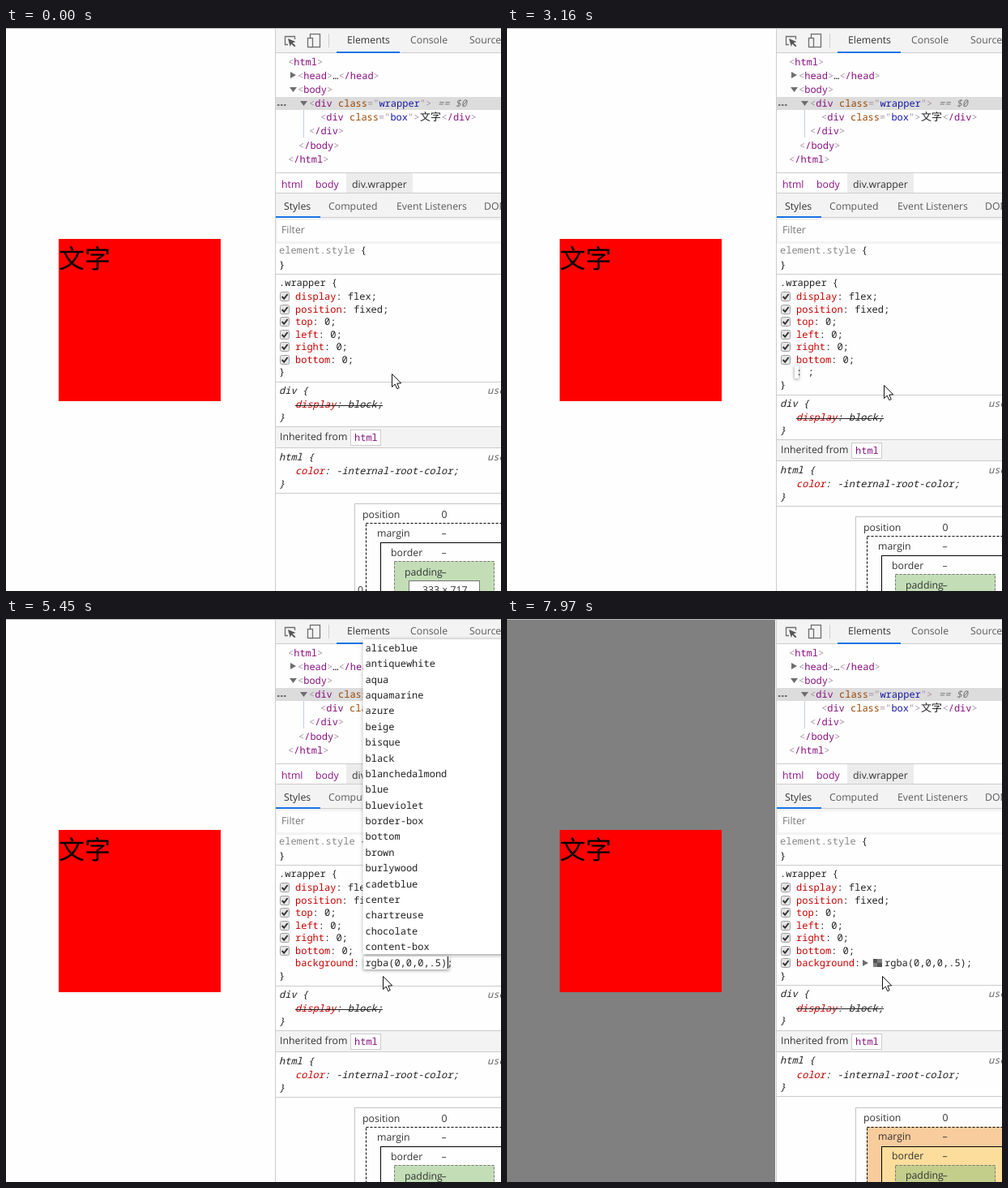
An HTML page with a canvas for the animation above (8000 ms loop, 611 by 694 pixels).

```html
<!DOCTYPE html>
<html lang="en">
<head>
<meta charset="utf-8">
<title>Styles panel</title>
<style>
  html, body { margin: 0; width: 100%; height: 100%; overflow: hidden; background: #fefefe; }
  canvas { display: block; }
</style>
</head>
<body>
<canvas id="stage" width="611" height="694"></canvas>
<script>
const ctx = document.getElementById('stage').getContext('2d');
const LOOP = 8000;
const MONO = '12px "Noto Sans Mono", monospace';
const UI = '12.3px "Open Sans", sans-serif';
const CJK = '"Noto Sans CJK SC", "Noto Sans CJK", sans-serif';
const DARK = '#222', GREY = '#888', RED = '#c80000', TAG = '#881280', BRACKET = '#a894a6',
      LINE = '#ccc', BAR = '#f3f3f3', BLUE = '#1a73e8', PAPER = '#fefefe';
const VALUE = 'rgba(0,0,0,.5)';

const borderItems = [
  ...['image', 'origin', 'position', 'position-x', 'position-y', 'repeat', 'repeat-x', 'repeat-y', 'size']
    .map(s => 'background-' + s),
  'block-size', 'border',
  ...['block-end', 'block-end-color', 'block-end-style', 'block-end-width', 'block-start', 'block-start-color',
    'block-start-style', 'block-start-width', 'bottom', 'bottom-color'].map(s => 'border-' + s)
];
const backgroundItems = ['backface-visibility', 'background', 'background-attachment', 'background-blend-mode',
  'background-clip', 'background-color', ...borderItems.slice(0, 9), 'flex-basis'];
const valueItems = ('aliceblue antiquewhite aqua aquamarine azure beige bisque black blanchedalmond blue ' +
  'blueviolet border-box bottom brown burlywood cadetblue center chartreuse chocolate content-box').split(' ');

const borderList = { x: 353, y: 25, right: 640, first: 27, items: borderItems, match: 'b', selected: 'border' };
const backgroundList = { x: 353, y: 103, right: 551, first: 113, items: backgroundItems, match: 'ba', selected: 'background' };
const valueList = { x: 440.5, y: 25, right: 640, first: 36, items: valueItems };

const edits = [
  [0, null],
  [1550, { typed: '' }],
  [3620, { typed: 'b', ghost: 'order', list: borderList }],
  [3900, { typed: 'ba', list: borderList }],
  [4020, { typed: 'ba', ghost: 'ckground', list: backgroundList }],
  [4430, { name: 'background', typed: '', list: valueList }],
  [5450, { name: 'background', typed: VALUE, list: valueList }],
  [5570, { name: 'background', typed: VALUE }],
  [6810, null]
];
const carets = [[0, 0], [1550, 1], [2080, 0], [2630, 1], [3160, 0], [3620, 1], [4990, 0], [5450, 1], [5980, 0], [6530, 1]];
const pointers = [[0, [476, 426]], [690, [474, 422]], [840, [471, 419]], [1120, [469, 418]], [1550, [469, 426]],
  [2200, [467, 436]], [2350, [466, 438]], [2480, [465, 440]], [7970, [463, 440]]];

const at = (steps, t) => steps.filter(s => s[0] <= t).pop()[1];

// Vertical positions snap to whole pixels, so half-pixel layout stays sharp.
function rect(x, y, w, h, color) {
  ctx.fillStyle = color;
  ctx.fillRect(x, Math.floor(y), w, h);
}

function frame(x, y, w, h, color, dash = [], fill) {
  if (fill) rect(x, y, w, h, fill);
  ctx.strokeStyle = color;
  ctx.lineWidth = 1;
  ctx.setLineDash(dash);
  ctx.strokeRect(x + .5, Math.floor(y) + .5, w - 1, h - 1);
  ctx.setLineDash([]);
}

function poly(points, fill, stroke) {
  ctx.beginPath();
  points.forEach(([x, y]) => ctx.lineTo(x, y));
  ctx.closePath();
  if (fill) { ctx.fillStyle = fill; ctx.fill(); }
  if (stroke) { ctx.strokeStyle = stroke; ctx.lineWidth = 1; ctx.stroke(); }
}

// Draws text centred on row y and returns the x where it ends.
function text(str, x, y, color = DARK, font = MONO) {
  ctx.font = font;
  ctx.fillStyle = color;
  ctx.fillText(str, x, Math.floor(y) + 4);
  return x + ctx.measureText(str).width;
}

function runs(x, y, parts, font) {
  for (const [str, color] of parts) x = text(str, x, y, color, font);
  return x;
}

const ui = (str, x, y, color = '#333') => text(str, x, y, color, UI);
const tag = name => [['<', BRACKET], [name, TAG], ['>', BRACKET]];
const openDiv = cls => [['<', BRACKET], ['div', TAG], [' class', '#994500'], ['="', BRACKET],
  [cls, '#1a1aa6'], ['"', BRACKET], ['>', BRACKET]];
const arrowDown = (x, y) => poly([[x, y - 3], [x + 9, y - 3], [x + 4.5, y + 3]], '#6e6e6e');
const arrowRight = (x, y) => poly([[x, y - 4], [x + 7, y], [x, y + 4]], '#6e6e6e');
const hline = (y, color = LINE) => rect(333, y, 278, 1, color);

function page(shaded) {
  rect(0, 0, 611, 694, PAPER);
  if (shaded) rect(0, 1, 331, 693, '#808080');
  rect(65, 260, 200, 200, '#f00');
  text('文字', 65, 292, '#000', '32px ' + CJK);
  rect(332, 0, 1, 694, LINE);
}

function toolbar() {
  rect(333, 1, 278, 29, BAR);
  hline(30);
  ctx.lineWidth = 1.3;
  ctx.strokeStyle = '#6e6e6e';
  ctx.beginPath();
  ctx.moveTo(348, 20.5); ctx.lineTo(344.5, 20.5); ctx.lineTo(344.5, 10.5);
  ctx.lineTo(356.5, 10.5); ctx.lineTo(356.5, 14);
  ctx.stroke();
  poly([[348, 13], [357.5, 17], [353.7, 18.2], [357.5, 22], [356, 23.3], [352.2, 19.6], [350.8, 23]], '#555');
  ctx.lineWidth = 1.3;
  ctx.strokeRect(375.5, 7.5, 12, 16);
  rect(372, 12, 7, 12, BAR);
  ctx.strokeRect(372.5, 12.5, 6, 11);
  rect(398, 7, 1, 17, LINE);
  ui('Elements', 421, 15);
  ui('Console', 499, 15, '#5a5a5a');
  ui('Sources', 572, 15, '#5a5a5a');
  rect(408, 29, 78, 2, BLUE);
}

function tree() {
  rect(333, 85, 278, 16, '#dcdcdc');
  for (let i = 0; i < 3; i++) rect(335 + i * 4, 94, 2.5, 2, '#6e6e6e');
  rect(367, 101, 1, 34, '#c4d0e4');
  runs(348, 42, tag('html'));
  arrowRight(351, 58);
  runs(360, 59, [...tag('head'), ['…', DARK], ...tag('/head')]);
  arrowDown(350, 76);
  runs(360, 76, tag('body'));
  arrowDown(363, 93);
  runs(374, 93, openDiv('wrapper'));
  text('== $0', 533, 93, '#777', 'italic ' + MONO);
  runs(388, 110, openDiv('box'));
  text('文字', 511, 110, DARK, '13px ' + CJK);
  runs(537.5, 110, tag('/div'));
  runs(374, 127, tag('/div'));
  runs(361, 145, tag('/body'));
  runs(348, 162, tag('/html'));
}

function sidebarTabs() {
  hline(178);
  rect(420, 179, 82, 24, '#ececec');
  ui('html', 340, 193, TAG);
  ui('body', 382, 193, TAG);
  ui('div.wrapper', 427, 193);
  hline(203);
  rect(333, 204, 278, 62, BAR);
  ui('Styles', 343, 220);
  ui('Computed', 398, 220, '#5a5a5a');
  ui('Event Listeners', 482, 220, '#5a5a5a');
  ui('DOM Breakpoints', 590, 220, '#5a5a5a');
  hline(233);
  rect(333, 232, 55, 2, BLUE);
  rect(335, 237, 276, 26, PAPER);
  ui('Filter', 340, 249, '#757575');
}

function checkbox(y) {
  ctx.beginPath();
  ctx.roundRect(338.5, y - 5.5, 11, 11, 2);
  ctx.fillStyle = '#e6e6e6';
  ctx.fill();
  ctx.strokeStyle = '#a0a0a0';
  ctx.lineWidth = 1;
  ctx.stroke();
  ctx.beginPath();
  ctx.moveTo(340.7, y); ctx.lineTo(343.2, y + 2.8); ctx.lineTo(347.6, y - 3);
  ctx.strokeStyle = '#333';
  ctx.lineWidth = 2;
  ctx.stroke();
}

function property(name, value, y, font) {
  return runs(357, y, [[name, RED], [': ' + value + ';', DARK]], font);
}

function agentRule(selector, name, value, top) {
  const italic = 'italic ' + MONO;
  text(selector + ' {', 337, top, DARK, italic);
  text('user agent stylesheet', 594, top, '#666', italic);
  const end = property(name, value, top + 17.5, italic);
  text('}', 337, top + 33, DARK, italic);
  return end;
}

function boxModel(s, shaded) {
  const ring = (x, y, dash, color, fill) => frame(x, y + s, 2 * (541 - x), 300, color, dash, fill);
  ring(430, 586.5, [1, 1], '#888');
  ring(444, 610.5, [3, 2], '#000', shaded ? '#f9cc9d' : PAPER);
  ring(462, 634.5, [], '#000', shaded ? '#fddd9b' : PAPER);
  ring(479, 657.5, [3, 2], '#777', shaded ? '#c3ce8b' : '#c3deb7');
  ring(497, 681.5, [], '#777', PAPER);
  [['position', 440, 600, '0'], ['margin', 458, 623, '–'], ['border', 475, 647, '–'], ['padding', 492, 671, '–']]
    .forEach(([label, x, y, size]) => {
      ui(label, x, y + s);
      ui(size, 537.5, y + s);
    });
  ui('333 × 717', 514, 693 + s);
  ui('0', 434, 693 + s);
}

function styles(committed, shift, shaded) {
  runs(337, 274, [['element.style', GREY], [' {', DARK]]);
  text('}', 337, 292);
  hline(303);
  text('.wrapper {', 337, 314);
  [['display', 'flex'], ['position', 'fixed'], ['top', '0'], ['left', '0'], ['right', '0'], ['bottom', '0']]
    .forEach(([name, value], i) => {
      const y = Math.round(331 + i * 15.5);
      checkbox(y);
      property(name, value, y);
    });
  if (committed) {
    checkbox(424);
    runs(357, 424, [['background', RED], [':', DARK]]);
    arrowRight(439, 424);
    rect(452, 419, 11, 10, '#808080');
    rect(452, 419, 5, 5, '#555');
    rect(457, 424, 6, 5, '#555');
    text(VALUE + ';', 466, 424);
  }
  text('}', 337, 424.5 + shift);

  hline(436 + shift);
  const end = agentRule('div', 'display', 'block', 447 + shift);
  rect(357, 465 + shift, end - 357, 1, DARK);
  hline(491.5 + shift);
  rect(333, 492.5 + shift, 278, 25, BAR);
  ui('Inherited from', 338, 504.5 + shift);
  frame(425, 495.5 + shift, 38, 20, LINE, [], '#fff');
  text('html', 430, 505.5 + shift, TAG);
  hline(517.5 + shift);
  agentRule('html', 'color', '-internal-root-color', 529 + shift);
  hline(573 + shift);
  boxModel(shift, shaded);
}

function shadowBox(x, y, w, h, blur) {
  ctx.save();
  ctx.shadowColor = 'rgba(0,0,0,.45)';
  ctx.shadowBlur = blur;
  ctx.shadowOffsetY = 1;
  rect(x, y, w, h, '#fff');
  ctx.restore();
}

function editor({ name, typed, ghost = '' }, caretOn) {
  const x = name ? runs(357, 424, [[name, RED], [': ', DARK]]) : 357;
  ctx.font = MONO;
  shadowBox(x - 2, 416, ctx.measureText(typed + ghost).width + 5, 16, 4);
  const caret = text(typed, x, 424);
  runs(caret, 424, [[ghost, '#808080'], [name ? ';' : ': ;', DARK]]);
  if (caretOn) rect(Math.round(caret + .4), 416, 1, 15, '#000');
}

function popup({ x, y, right, first, items, match, selected }) {
  shadowBox(x, y, right - x, 413 - y, 5);
  ctx.save();
  ctx.beginPath();
  ctx.rect(x, y, right - x, 413 - y);
  ctx.clip();
  items.forEach((item, i) => {
    const row = Math.round(first + i * 19.37), left = x + 3;
    if (item === selected) {
      rect(x, row - 10, right - x, 20, BLUE);
      text(item, left, row, '#fff', 'bold ' + MONO);
      return;
    }
    const cut = match ? item.indexOf(match) : -1;
    if (cut < 0) return text(item, left, row);
    const boldX = text(item.slice(0, cut), left, row);
    const restX = text(match, boldX, row, '#111', 'bold ' + MONO);
    text(item.slice(cut + match.length), restX, row);
  });
  ctx.restore();
}

function pointer([x, y]) {
  const shape = [[0, 0], [0, 16], [3.7, 12.6], [6.3, 18.2], [8.7, 17.1], [6.3, 11.6], [11.2, 11.4]];
  poly(shape.map(([dx, dy]) => [x + dx + .5, y + dy + .5]), '#fff', '#111');
}

function draw(t) {
  const edit = at(edits, t), shaded = t >= 5570, committed = t >= 6810;
  const shift = committed ? 15.5 : edit ? 16 : 0;
  page(shaded);
  toolbar();
  tree();
  sidebarTabs();
  styles(committed, shift, shaded);
  if (edit) {
    if (edit.list) popup(edit.list);
    editor(edit, at(carets, t));
  }
  rect(0, 0, 611, 1, '#b8b8b8');
  pointer(at(pointers, t));
}

ctx.textRendering = 'geometricPrecision';
const start = performance.now();
function tick() {
  draw((performance.now() - start) % LOOP);
  requestAnimationFrame(tick);
}
tick();
</script>
</body>
</html>
```
